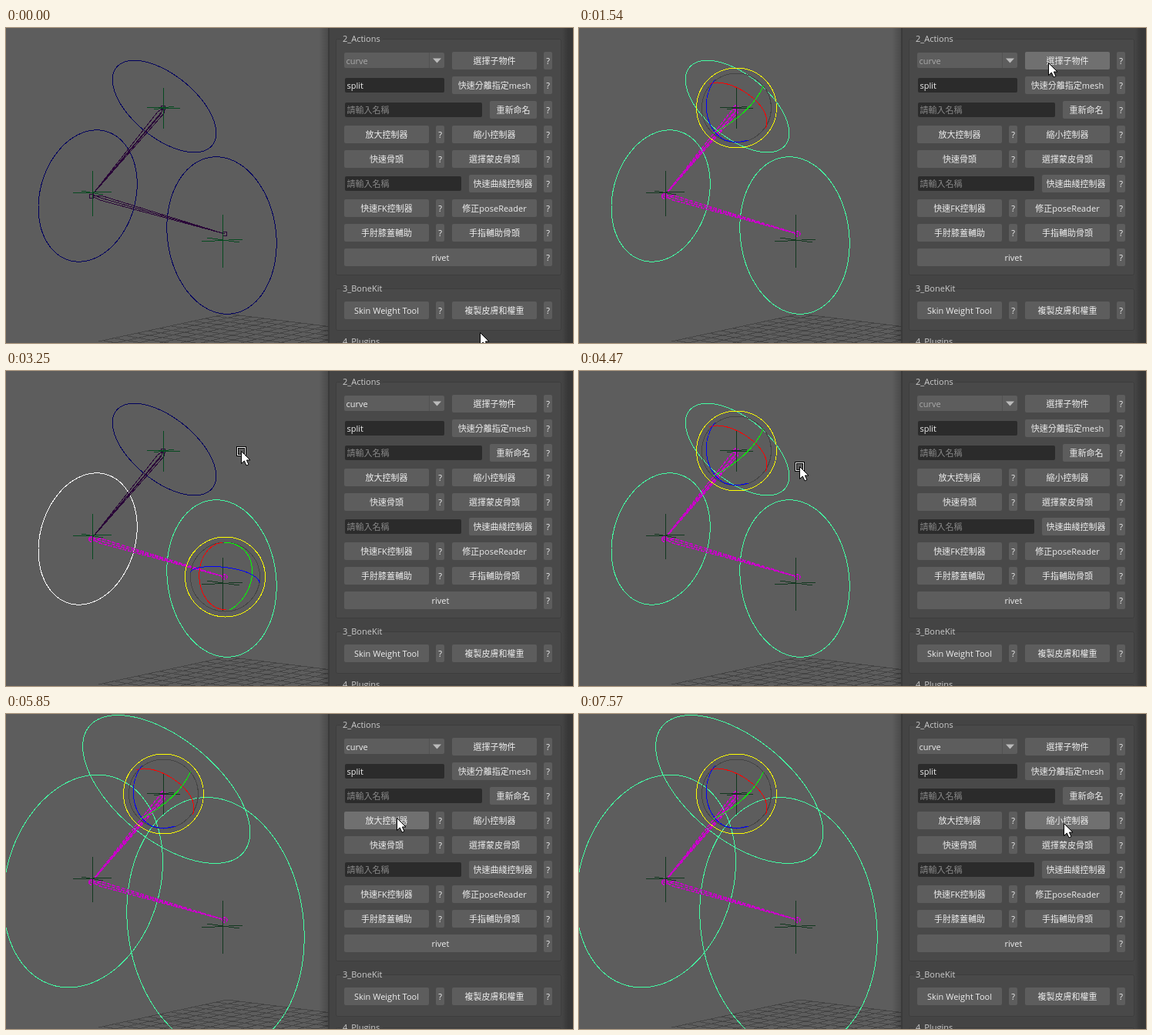
Recreate the animation shown at these times as an HTML page. Size 736x410 px, loop 8000 ms.

```html
<!DOCTYPE html>
<html lang="zh-Hant">
<head>
<meta charset="utf-8">
<style>
html, body { margin: 0; width: 100%; height: 100%; overflow: hidden; background: #5d5d5d; }
svg { display: block; }
text { font: 500 11px "Open Sans", "Noto Sans CJK TC", "Noto Sans CJK", sans-serif; fill: #eee; white-space: pre; }
.mid { text-anchor: middle; }
.wire { fill: none; shape-rendering: crispEdges; }
.btn { fill: #5d5d5d; }
.btn.hover { fill: #707070; }
.field { fill: #2b2b2b; }
</style>
</head>
<body>
<svg width="736" height="410" viewBox="0 0 736 410">
  <defs>
    <linearGradient id="shade"><stop stop-opacity="0"/><stop offset="1" stop-opacity=".2"/></linearGradient>
  </defs>
  <rect width="419" height="410" fill="#5d5d5d"/>
  <g id="grid" class="wire" stroke="#444"></g>
  <g id="scene" class="wire"></g>
  <rect x="406" width="12" height="410" fill="url(#shade)"/>
  <rect x="418" width="318" height="410" fill="#444"/>
  <rect x="418" width="2" height="410" fill="#3a3a3a"/>
  <rect x="722" width="8" height="410" fill="url(#shade)"/>
  <rect x="730" width="6" height="410" fill="#373737"/>
  <g id="panel"></g>
  <g id="cursor">
    <g id="pick" class="wire">
      <rect x="-4.5" y="-4.5" width="10" height="10" stroke="#000" stroke-width="3"/>
      <rect x="-4.5" y="-4.5" width="10" height="10" stroke="#fff"/>
    </g>
    <path d="M.5 .5V16.5L4.3 13 7 19 10 17.7 7.4 12H12Z" fill="#fff" stroke="#000"/>
  </g>
</svg>
<script>
const $ = id => document.getElementById(id);
const LOOP = 8000;

// ---------- floor grid ----------
let floor = '';
for (let i = 0; i < 20; i++) {
  floor += `M${287 + 16 * i} ${372 + 2 * i}l-${167 + 12 * i} ${36 + 4 * i}`;
  floor += `M${287 - 14.5 * i} ${372 + 3.2 * i}l400 ${50 + 2 * i}`;
}
$('grid').innerHTML = `<path d="${floor}"/>`;

// ---------- tool panel ----------
const buttons = [];
let ui = '';
const label = (s, x, y, extra = '') => ui += `<text x="${x}" y="${y}" ${extra}>${s}</text>`;
function group(title, top, bottom) {
  ui += `<rect x="428.5" y="${top + .5}" width="292" height="${bottom - top}" rx="2" fill="#494949" stroke="#3d3d3d"/>
    <rect x="434" y="${top - 1}" width="55" height="3" fill="#444"/>`;
  label(title, 437, top + 4, 'style="fill:#ccc"');
}
function button(s, x1, x2, y) {
  buttons.push([x1, y - 11, x2, y + 12]);
  ui += `<rect class="btn" x="${x1}" y="${y - 11}" width="${x2 - x1}" height="23" rx="2"/>`;
  label(s, (x1 + x2) / 2, y + 5, 'class="mid"');
}
function field(s, x2, y, hint) {
  ui += `<rect class="field" x="440" y="${y - 9}" width="${x2 - 440}" height="19" rx="2"/>`;
  label(s, 442.5, y + 5, hint ? 'style="fill:#888"' : '');
}
const left = (s, y) => { button(s, 439, 549, y); button('?', 558, 569, y); };
const right = (s, y, x = 579) => { button(s, x, 689, y); button('?', 698, 709, y); };

group('2_Actions', 14, 321);
group('3_BoneKit', 339, 393);
group('4_Plugins', 408, 450);
ui += `<rect x="439" y="32" width="130" height="20" rx="2" fill="#5d5d5d"/>
  <rect x="549" y="32" width="1" height="20" fill="#525252"/>
  <path d="M554 39.5H565L559.5 45.5Z" fill="#bbb"/>`;
label('curve', 441.5, 47, 'id="combo"');
right('選擇子物件', 42);
field('split', 569, 74);
right('快速分離指定mesh', 74);
field('請輸入名稱', 618, 106, true);
right('重新命名', 106, 628);
left('放大控制器', 138);
right('縮小控制器', 138);
left('快速骨頭', 170);
right('選擇蒙皮骨頭', 170);
field('請輸入名稱', 591, 202, true);
right('快速曲綫控制器', 202, 601);
left('快速FK控制器', 234);
right('修正poseReader', 234);
left('手肘膝蓋輔助', 266);
right('手指輔助骨頭', 266);
right('rivet', 298, 439);
left('Skin Weight Tool', 367);
right('複製皮膚和權重', 367);
$('panel').innerHTML = ui;
const faces = [...document.querySelectorAll('.btn')];

// ---------- rig ----------
const NAVY = '#00005f', MINT = '#43ffa3', WHITE = '#fff';
// pivot, centre drift by perspective, half sizes, skew
const rings = [
  { x: 203.8, y: 104.5, dx: 1.7, dy: -2.5, w: 67.2, h: 59.7, skew: .58 },
  { x: 110, y: 219.1, dx: -3.9, dy: -.6, w: 64, h: 85.5, skew: -.18 },
  { x: 285, y: 267.5, dx: -5, dy: 2.5, w: 71, h: 102, skew: .1 }
];
const bones = [
  'M204 104L197 109 112 217 206 110ZM204 104L201 112 112 217 203 108M201 104a3 3 0 1 0 6 0a3 3 0 1 0-6 0',
  'M112 219L123 218 284 268 122 224ZM112 217L126 222 284 268M108 219a3 3 0 1 0 6 0a3 3 0 1 0-6 0M281 268a3 3 0 1 0 6 0a3 3 0 1 0-6 0'
];
const crosses = [
  'M204.5 78V131M183 103L226 105M192 106L218 102',
  'M112.5 186V245M87 215L137 213M98 212L126 217',
  'M281.5 243V312M254 278L307 275M261 273L303 279'
];
const gizmos = [
  { at: '204.5 104', red: 'M-35-31C-12-42 50-5 38 27', green: 'M35-29Q20 6-30 33', blue: 'M-28-37C-48-10-40 30-15 42Q0 47 15 42' },
  { at: '284.5 268', red: 'M-4-45C-46-38-43 42 2 43', green: 'M-2-45C46-45 46 20 6 43', blue: 'M-45-6C-40-20 40-14 45 8' }
];
const states = {
  none: { ring: [NAVY, NAVY, NAVY], bone: [0, 0], cross: [0, 0, 0] },
  root: { ring: [MINT, MINT, MINT], bone: [1, 1], cross: [1, 1, 1], gizmo: gizmos[0] },
  kids: { ring: [NAVY, WHITE, MINT], bone: [0, 1], cross: [0, 0, 1], gizmo: gizmos[1] }
};
const line = (d, c, more = '') => `<path d="${d}" stroke="${c}" ${more}/>`;

function ringPath({ x, y, dx, dy, w, h, skew }, s) {
  const cx = x + dx * s * s, cy = y + dy * s * s, tilt = Math.asin(skew);
  // nearer edges grow a little faster than the scale
  const grow = s * (1 + s * s * ((dx / w) ** 2 + (dy / h) ** 2) / 2);
  let d = '';
  for (let i = 0; i < 180; i++) {
    const a = i * Math.PI / 90;
    d += `${i ? 'L' : 'M'}${(cx + w * grow * Math.cos(a)).toFixed(1)} ${(cy + h * grow * Math.sin(a + tilt)).toFixed(1)}`;
  }
  return d + 'Z';
}

function drawScene({ ring, bone, cross, gizmo }, size) {
  let out = rings.map((r, i) => line(ringPath(r, size), ring[i])).join('');
  out += bones.map((d, i) => bone[i]
    ? line(d, '#c800c8', 'stroke-width="1.6" stroke-dasharray="5 1.5"')
    : line(d, '#2a0638')).join('');
  out += crosses.map((d, i) => line(d, cross[i] ? '#12381f' : '#064a20')).join('');
  if (gizmo) out += `<g transform="translate(${gizmo.at})"><circle r="45" stroke="#444"/><circle r="52" stroke="#ff0"/>`
    + line(gizmo.red, '#f00') + line(gizmo.green, '#0f0') + line(gizmo.blue, '#00f') + '</g>';
  $('scene').innerHTML = out;
}

// ---------- timeline ----------
const pointer = [
  [0, 615, 396], [170, 560, 330], [340, 420, 225], [520, 300, 145], [690, 270, 133], [870, 285, 122],
  [1040, 400, 90], [1210, 551, 59], [1370, 586, 51], [1540, 609, 45], [2580, 596, 50], [2750, 530, 70],
  [2920, 430, 90], [3090, 340, 100], [3250, 305, 104], [3960, 290, 112], [4130, 272, 125],
  [4470, 286, 124], [4640, 345, 130], [4810, 440, 134], [4980, 507, 135], [7050, 623, 143], [7230, 629, 142]
];
const selection = [[0, 'none'], [690, 'root'], [2410, 'kids'], [4300, 'root']];
const focus = [[0, false], [2410, true], [4300, false], [5160, true]];
// number of 10 % enlargements
const growth = [
  [0, 0], [5160, 1], [5330, 2], [5510, 3], [5680, 4], [5850, 5],
  [6700, 8], [6870, 10], [7230, 9], [7400, 7], [7570, 5]
];
const at = (track, t) => track.findLast(k => k[0] <= t).slice(1);

let shown = '';
function frame(now) {
  const t = now % LOOP;
  const [x, y] = at(pointer, t), [sel] = at(selection, t), [n] = at(growth, t), [lit] = at(focus, t);
  $('cursor').setAttribute('transform', `translate(${x} ${y})`);
  $('pick').style.display = x < 418 ? '' : 'none';
  $('combo').style.fill = lit ? '#eee' : '#aaa';
  faces.forEach((f, i) => {
    const [x1, y1, x2, y2] = buttons[i];
    f.classList.toggle('hover', x >= x1 && x < x2 && y >= y1 && y < y2);
  });
  if (shown !== sel + n) {
    shown = sel + n;
    drawScene(states[sel], 1.1 ** n);
  }
  requestAnimationFrame(frame);
}
requestAnimationFrame(frame);
</script>
</body>
</html>
```
